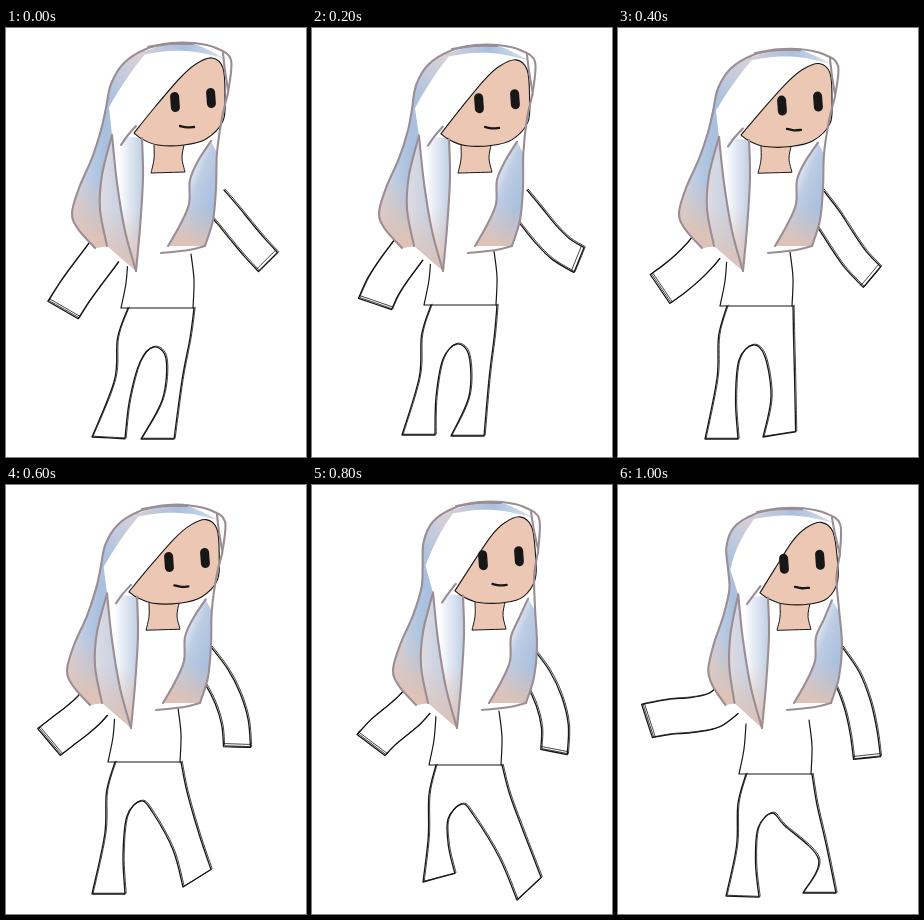
An HTML page with a canvas for the animation above (1200 ms loop, 300 by 429 pixels).

```html
<!DOCTYPE html>
<html lang="en">
<head>
<meta charset="utf-8">
<title>Walking girl</title>
<style>
html, body { margin: 0; width: 100%; height: 100%; overflow: hidden; background: #fff; }
canvas { display: block; width: 100vw; height: 100vh; }
</style>
</head>
<body>
<canvas></canvas>
<script>
const BLUE = '#a9c0de', PALE = '#bccce3', PINK = '#dfc2b5', CLEAR = 'rgba(223,194,181,0)';
const MAUVE = '#9b8d94', INK = '#171717', SKIN = '#ecc7b3';

// head: shift x, y, sway of the hair, tuck of its left side; waist: centre;
// hands: x, y, direction in degrees; feet: left end x, y, slope; knee: bulge of the right leg
const poses = [
  { head: [0, 0, 0, 0], waist: [152, 280], hands: [[57, 282, 120], [262, 234, 45]],
    feet: [[86, 409, 3], [135, 411, 0]], knee: 9 },
  { head: [-2, 2, 3, 0], waist: [149, 277], hands: [[63, 276, 109], [267, 232, 22]],
    feet: [[90, 407, 0], [139, 408, 0]], knee: 9 },
  { head: [-5, 6, 0, 0], waist: [139, 278], hands: [[42, 261, 146], [254, 249, 40]],
    feet: [[87, 411, 0], [145, 409, -9]], knee: 7 },
  { head: [-6, 5, 1, 0], waist: [139, 277], hands: [[43, 257, 140], [231, 262, 92]],
    feet: [[86, 409, 0], [177, 402, -32]], knee: 5 },
  { head: [2, 2, 13, 0], waist: [154, 280], hands: [[59, 260, 127], [242, 267, 101]],
    feet: [[111, 397, -15], [205, 415, -43]], knee: 4 },
  { head: [-3, 8, 17, 0.25], waist: [158, 289], hands: [[29, 236, 162], [249, 273, 84]],
    feet: [[108, 411, 2], [185, 408, 0]], knee: 25 }
];

const parse = s => s.split(' ').map(p => p.split(',').map(Number));
const hair = {
  outer: parse('187,16 163,16 140,21 118,35 105,56 100,80 95,102 86,130 73,160 66,185 72,201 89,220'),
  inner: parse('106,107 96,147 94,181 101,218'),
  lock: parse('106,107 111,155 119,203 130,243'),
  strand: parse('136,110 137,150 134,200 130,243'),
  right: parse('222,65 216,90 211,125 210,160 207,192 199,218'),
  hem: parse('199,218 183,222 155,225'),
  curl: parse('205,113 192,133 184,152 183,176 174,197 162,218'),
  fringe: parse('115,117 122,107 130,98'),
  crown: parse('142,19 165,15 188,15 210,20 225,32 222,65'),
  corner: parse('217,25 219,43 222,62')
};
const side = parse('102,70 95,102 86,130 73,160 66,185 72,201 89,220');
const temple = [parse('139,22 118,36 105,56 98,88'), parse('140,25 126,43 112,64 98,88')];
const brow = [parse('136,24 163,16 188,16 220,31'), parse('136,27 163,23 190,24 220,31')];
const face = parse('128,105 149,79 174,50 190,36 206,30 217,40 219,68 217,93 200,111 178,117 152,117 136,111 128,105');
const neck = [parse('148,117 148,131 145,145'), parse('145,145 179,144'), parse('179,144 176,130 178,117')];

const canvas = document.querySelector('canvas');
const c = canvas.getContext('2d');
const clamp = v => Math.max(0, Math.min(1, v));
const move = ([x, y], deg, d) => {
  const a = deg * Math.PI / 180;
  return [x + Math.cos(a) * d, y + Math.sin(a) * d];
};
const between = (a, b, t) => [a[0] + (b[0] - a[0]) * t, a[1] + (b[1] - a[1]) * t];

// Smooth curve through the points.
function curve(path, pts) {
  for (let i = 0; i < pts.length - 1; i++) {
    const a = pts[i - 1] || pts[i], b = pts[i], d = pts[i + 1], e = pts[i + 2] || d;
    path.bezierCurveTo(
      b[0] + (d[0] - a[0]) / 6, b[1] + (d[1] - a[1]) / 6,
      d[0] - (e[0] - b[0]) / 6, d[1] - (e[1] - b[1]) / 6, ...d);
  }
}

// Curves joined end to end, with corners between them.
function draw(parts, color, width, fill) {
  const path = new Path2D();
  path.moveTo(...parts[0][0]);
  for (const pts of parts) curve(path, pts);
  if (fill) { c.fillStyle = fill; c.fill(path); }
  c.strokeStyle = color;
  c.lineWidth = width;
  c.stroke(path);
}

function sketch(...parts) {
  draw(parts, INK, 1.3);
  c.save();
  c.translate(1.2, -0.8);
  draw(parts, INK, 0.8);
  c.restore();
}

// Fills the area between two edges with colours running from one point to another.
function shade(a, b, from, to, ...colors) {
  const path = new Path2D(), back = [...b].reverse();
  path.moveTo(...a[0]);
  curve(path, a);
  path.lineTo(...back[0]);
  curve(path, back);
  const g = c.createLinearGradient(...from, ...to);
  colors.forEach((color, i) => g.addColorStop(i / Math.max(1, colors.length - 1), color));
  c.fillStyle = g;
  c.fill(path);
}

// A sleeve of even width that leaves the shoulder and reaches the hand in given directions.
function arm(root, angle, [x, y, end], width) {
  const hand = [x, y], reach = Math.hypot(x - root[0], y - root[1]) / 3;
  const p1 = move(root, angle, reach), p2 = move(hand, end, -reach);
  const edges = [[], []];
  for (let t = 0; t <= 1; t += 0.25) {
    const a = between(root, p1, t), b = between(p1, p2, t), d = between(p2, hand, t);
    const q = between(a, b, t), r = between(b, d, t), mid = between(q, r, t);
    const deg = Math.atan2(r[1] - q[1], r[0] - q[0]) * 180 / Math.PI;
    edges.forEach((edge, i) => edge.push(move(mid, deg + 90 - 180 * i, width / 2)));
  }
  const [one, two] = edges;
  sketch(one, [one[4], two[4]], [...two].reverse());
  draw([[move(one[4], end, -3), move(two[4], end, -3)]], INK, 0.8);
}

function body({ waist: [x, y], feet, knee }) {
  const l = x - 36, r = x + 36, fork = [x - 4, y + 39];
  draw([[[l + 6, y - 50], [l + 4, y - 25], [l - 1, y]], [[l - 1, y], [r, y]]], INK, 1.2);
  draw([[[r - 3, y - 54], [r, y - 28], [r - 1, y]]], INK, 1.2);
  const [a, b] = feet.map(f => [[f[0], f[1]], move(f, f[2], 33)]);
  const thigh = (hip, foot, t, dy) => [hip + (foot[0] - hip) * t, y + dy];
  const inner = (dx, dy, foot, bulge) => {
    const top = [fork[0] + dx, fork[1] + dy], mid = between(top, foot, 0.5);
    return [top, [mid[0] + bulge, mid[1]]];
  };
  const [la, lb] = inner(-14, 15, a[1], -3), [ra, rb] = inner(12, 12, b[0], knee);
  sketch(
    [[l + 6, y], thigh(l, a[0], 0.15, 30), thigh(l, a[0], 0.25, 72), a[0]],
    a, [a[1], lb, la, fork, ra, rb, b[0]], b,
    [b[1], thigh(r, b[1], 0.6, 72), thigh(r, b[1], 0.2, 30), [r, y]]);
}

function head([dx, dy, sway, tuck]) {
  // The top follows the skull, the lower part swings.
  const warp = pts => pts.map(([x, y]) => {
    const swing = clamp((y - 30) / 75) * clamp((260 - x) / 110 + Math.max(0, (y - 95) / 90));
    return [
      x + dx + sway * swing + tuck * Math.max(0, 107 - x),
      y + dy * Math.max(0, (150 - y) / 130)
    ];
  });
  const h = {};
  for (const k in hair) h[k] = warp(hair[k]);
  const edge = warp(side), left = edge[4][0], tip = h.lock[3], end = h.right[5];

  draw(neck.map(warp), INK, 1, SKIN);
  shade(h.outer, h.strand, [0, 0], [1, 0], '#fff');
  shade(...temple.map(warp), [105 + dx, 75], [138 + dx, 28], BLUE, '#c3cbdd', '#dbd1d4');
  shade(...brow.map(warp), [136 + dx, 0], [222 + dx, 0], '#d5cfd6', BLUE, '#dfe3ec');
  shade(edge, h.inner, [left, 0], [h.inner[2][0] + 4, 0], '#ddd2d4', PALE, BLUE);
  shade(edge, h.inner, [left + 12, 150], [left + 8, 212], CLEAR, PINK);
  shade(h.inner, h.lock, [h.inner[2][0], 0], [tip[0] - 6, 0], '#dedbe2', PALE);
  shade(h.lock, h.strand, [tip[0] - 18, 0], [tip[0] + 8, 0], '#fff', PALE);
  shade(h.inner, h.strand, [tip[0], 180], tip, CLEAR, PINK);
  shade(h.curl, h.right.slice(2), [end[0] - 30, 160], [end[0] + 8, 175], '#fff', PALE, BLUE);
  shade(h.curl, h.right.slice(2), [end[0] - 12, 175], [end[0] - 24, 216], CLEAR, PINK);

  draw([warp(face)], INK, 1.1, SKIN);
  for (const k in h) draw([h[k]], MAUVE, 2.1);

  const drop = dy * 0.6;
  for (const [x, y] of [[169, 74], [205, 70]])
    draw([[[x + dx - 0.4, y + drop - 5.5], [x + dx + 0.4, y + drop + 5.5]]], INK, 9);
  const mx = 181 + dx + sway * 0.35, my = 99 + drop * 0.8;
  draw([[[mx - 7, my - 1], [mx, my + 0.4], [mx + 7, my]]], INK, 2.3);
}

function girl(p) {
  const x = p.waist[0];
  arm([x - 46, 213], 125, p.hands[0], 35);
  arm([x + 56, 171], 48, p.hands[1], 27);
  // Hair hides the shoulders.
  c.fillStyle = '#fff';
  c.fillRect(x - 40, 120, 92, 104);
  body(p);
  head(p.head);
}

function frame(now) {
  const ratio = devicePixelRatio || 1;
  const w = Math.round(innerWidth * ratio), h = Math.round(innerHeight * ratio);
  if (canvas.width !== w || canvas.height !== h) { canvas.width = w; canvas.height = h; }
  c.setTransform(w / 300, 0, 0, h / 429, 0, 0);
  c.fillStyle = '#fff';
  c.fillRect(0, 0, 300, 429);
  c.lineCap = c.lineJoin = 'round';
  girl(poses[Math.floor(now / 200) % poses.length]);
  requestAnimationFrame(frame);
}
frame(performance.now());
</script>
</body>
</html>
```
